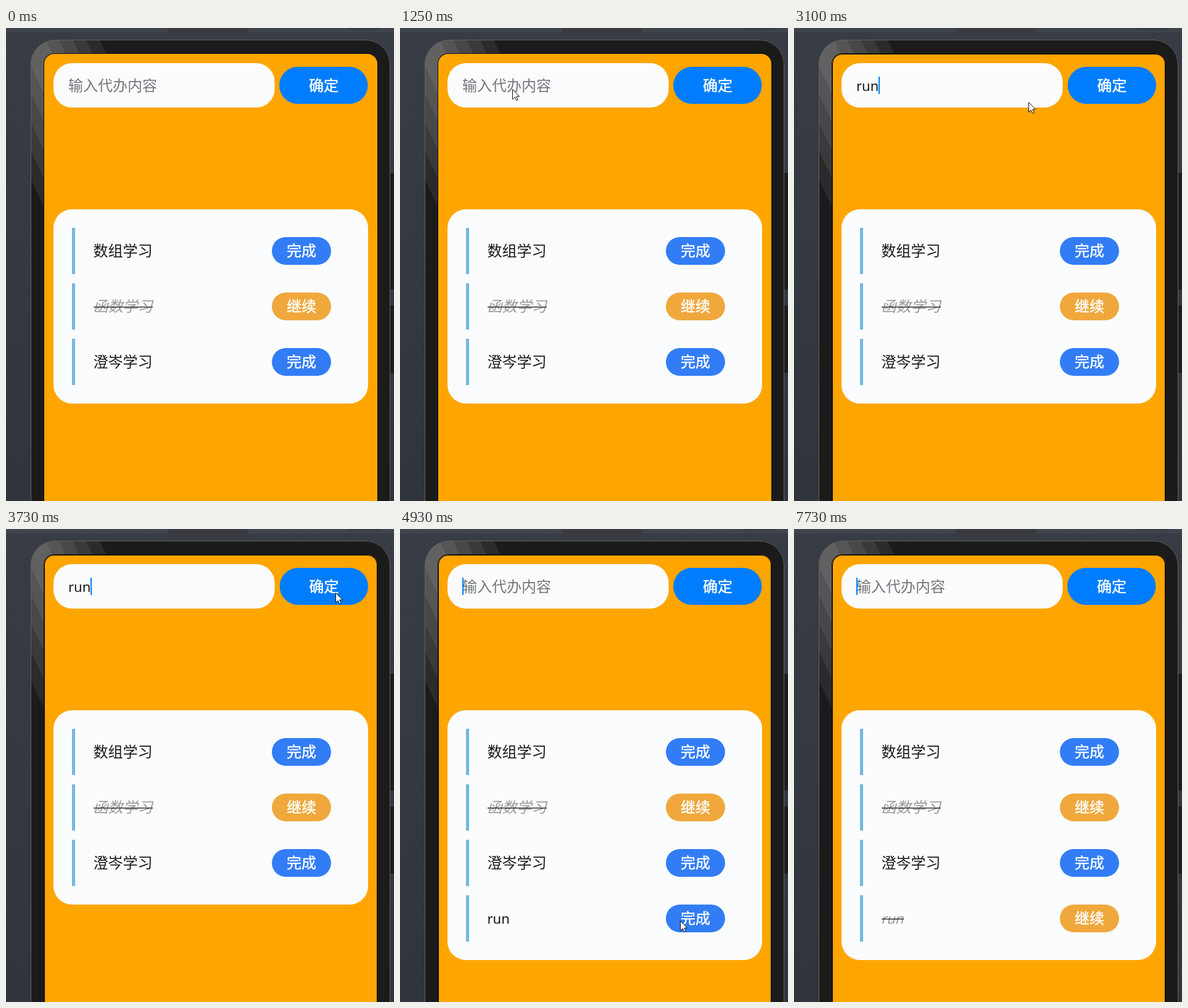
An HTML page for the animation above (8000 ms loop, 629x767 px).

```html
<!DOCTYPE html>
<html lang="zh-CN">
<head>
<meta charset="utf-8">
<title>待办列表</title>
<style>
  html, body { margin: 0; width: 100%; height: 100%; overflow: hidden; background: #343841; }
  svg { display: block; width: 629px; height: 767px; }
  text { font: 24px "Noto Sans CJK SC", "Noto Sans CJK", sans-serif; fill: #17181a; }
  .latin { font: 22px "Noto Sans", sans-serif; }
  .label { fill: #fff; stroke: #fff; stroke-width: .5px; text-anchor: middle; }
  .hint { fill: #74777b; }
  .faded { fill: #96999b; }
  .strike { stroke: #2c3032; stroke-width: 1.3; }
  .card, .field { fill: #fafcfe; }
  .blue { fill: #327df6; }
  .amber { fill: #f0a83c; }

  /* one loop is 8 s, so 1% is 80 ms */
  .step { animation: 8s step-end infinite; }
  .focus { animation-name: focus; }
  .hint { animation-name: hint; }
  .r { animation-name: r; }
  .u { animation-name: u; }
  .n { animation-name: n; }
  .caret { animation-name: blink, caretMove; animation-duration: 8s, 8s; }
  .nudge { animation-name: nudge; }
  .added { animation-name: added; }
  .todo { animation-name: todo; }
  .done { animation-name: done; }
  .pillPress { animation-name: pillPress; }
  .press { fill: #007dff; animation: press 8s linear infinite; }
  .pointer { animation: travel 8s linear infinite, pointerShow 8s step-end infinite; }

  @keyframes focus { 0% { visibility: hidden } 18.75%, 100% { visibility: visible } }
  @keyframes hint {
    0%, 50.875%, 100% { visibility: visible }
    28.625% { visibility: hidden }
  }
  @keyframes r { 0%, 50.875%, 100% { visibility: hidden } 28.625% { visibility: visible } }
  @keyframes u { 0%, 50.875%, 100% { visibility: hidden } 30.875% { visibility: visible } }
  @keyframes n { 0%, 50.875%, 100% { visibility: hidden } 32.125% { visibility: visible } }
  @keyframes blink {
    0%, 27.375%, 39.75%, 52.125%, 64.375%, 77.375%, 90%, 100% { visibility: hidden }
    21.125%, 28.625%, 45%, 57.875%, 71.25%, 83.75%, 96.625% { visibility: visible }
  }
  @keyframes caretMove {
    0%, 50.875%, 100% { transform: none }
    28.625% { transform: translateX(9px) }
    30.875% { transform: translateX(22.5px) }
    32.125% { transform: translateX(36px) }
  }
  @keyframes nudge {
    0%, 50.875%, 100% { transform: none }
    28.625% { transform: translateX(.6px) }
  }
  @keyframes press {
    0%, 50.24%, 54%, 100% { fill: #007dff }
    50.25%, 52.125% { fill: #0074ee }
  }
  @keyframes added { 0% { visibility: hidden } 50.875%, 100% { visibility: visible } }
  @keyframes todo {
    0%, 68.75%, 100% { visibility: hidden }
    50.875% { visibility: visible }
  }
  @keyframes pillPress { 0%, 68.75%, 100% { fill: #327df6 } 67.875% { fill: #2d70dd } }
  @keyframes done { 0% { visibility: hidden } 68.75%, 100% { visibility: visible } }
  @keyframes pointerShow {
    0%, 27.375%, 85.625%, 100% { visibility: hidden }
    1.25%, 38.75% { visibility: visible }
  }
  @keyframes travel {
    0%, 1.25% { transform: translate(205px, 760px) }
    3.75% { transform: translate(222px, 558px) }
    6.25% { transform: translate(237px, 315px) }
    8.75% { transform: translate(190px, 116px) }
    10.5%, 38.74% { transform: translate(182px, 99px) }
    38.75%, 39.74% { transform: translate(380px, 120px) }
    39.75%, 41.5% { transform: translate(428px, 143px) }
    44% { transform: translate(550px, 130px) }
    46.625%, 52.125% { transform: translate(534px, 103px) }
    54.375% { transform: translate(500px, 200px) }
    56.25% { transform: translate(454px, 311px) }
    57.5% { transform: translate(437px, 405px) }
    58.75% { transform: translate(440px, 490px) }
    60.375% { transform: translate(441px, 582px) }
    61.625%, 62.49% { transform: translate(454px, 635px) }
    62.5%, 75.99% { transform: translate(457px, 640px) }
    76%, 76.625% { transform: translate(458px, 644px) }
    78.75% { transform: translate(467px, 668px) }
    81.875% { transform: translate(480px, 715px) }
    85.625%, 100% { transform: translate(492px, 775px) }
  }
</style>
</head>
<body>
<svg viewBox="0 0 629 767">
  <defs>
    <linearGradient id="wall" x2="0" y2="1">
      <stop stop-color="#383c45"/>
      <stop offset="1" stop-color="#30343c"/>
    </linearGradient>
    <clipPath id="shell"><rect x="40" y="19" width="583" height="800" rx="40"/></clipPath>
    <path id="ray" d="M-15-101L245 445" stroke="#fff" stroke-opacity=".07"/>
    <rect id="bar" x="107" y="324" width="5" height="75" fill="#74b8de"/>
    <rect id="pill" x="431" y="339" width="96" height="45" rx="22.5"/>
    <g id="finish">
      <use href="#pill"/>
      <text class="label" x="479" y="370">完成</text>
    </g>
    <g id="resume">
      <use href="#pill"/>
      <text class="label" x="479" y="370">继续</text>
    </g>
  </defs>

  <!-- desktop -->
  <rect width="629" height="767" fill="url(#wall)"/>
  <rect width="629" height="7" fill="#40444c"/>
  <rect x="263" y="-10" width="130" height="24" rx="9" fill="#393b40"/>
  <rect x="557.5" y="-8.5" width="49" height="10" fill="none" stroke="#2b2e34"/>
  <rect x="616" y="235" width="30" height="189" rx="4" fill="#1d1d1e"/>
  <rect x="616" y="450" width="30" height="109" rx="4" fill="#1d1d1e"/>

  <!-- phone -->
  <g clip-path="url(#shell)">
    <rect width="629" height="767" fill="#1b1b1b"/>
    <use href="#ray" stroke-width="198"/>
    <use href="#ray" stroke-width="158"/>
    <use href="#ray" stroke-width="119"/>
    <use href="#ray" stroke-width="79"/>
    <use href="#ray" stroke-width="40"/>
  </g>
  <rect x="40.5" y="19.5" width="582" height="800" rx="39.5" fill="none" stroke="#626262"/>
  <rect x="61" y="41" width="542" height="780" rx="17" fill="#111"/>
  <rect x="62" y="42" width="540" height="780" rx="16" fill="#ffa500"/>
  <rect class="step focus" x="62.5" y="42.5" width="539" height="780" rx="15.5" fill="none" stroke="#15130f"/>

  <!-- input line -->
  <rect class="field" x="77" y="57" width="358.5" height="72" rx="30"/>
  <text class="step hint" x="101" y="102">输入代办内容</text>
  <text class="latin" x="101" y="102"><tspan class="step r">r</tspan><tspan class="step u">u</tspan><tspan class="step n">n</tspan></text>
  <rect class="step caret" x="101" y="79" width="2" height="28" fill="#007dff"/>
  <g class="step nudge">
    <rect class="press" x="443" y="63" width="143.5" height="60" rx="30"/>
    <text class="label" x="515" y="102">确定</text>
  </g>

  <!-- list -->
  <rect class="card" x="77" y="294" width="510" height="315" rx="30"/>
  <g class="step added">
    <rect class="card" x="77" y="294" width="510" height="405" rx="30"/>
    <use href="#bar" y="270"/>
  </g>
  <use href="#bar"/>
  <use href="#bar" y="90"/>
  <use href="#bar" y="180"/>

  <text x="141.5" y="370">数组学习</text>
  <use href="#finish" class="blue"/>

  <text class="faded" transform="translate(141.5 460) skewX(-14)">函数学习</text>
  <path class="strike" d="M142 452.5H238"/>
  <use href="#resume" class="amber" y="90"/>

  <text x="141.5" y="550">澄岑学习</text>
  <use href="#finish" class="blue" y="180"/>

  <g class="step todo">
    <text class="latin" x="141.5" y="640">run</text>
    <use href="#finish" class="step pillPress" y="270"/>
  </g>
  <g class="step done">
    <text class="latin faded" transform="translate(141 640) skewX(-14)">run</text>
    <path class="strike" d="M142 632.5H178"/>
    <use href="#resume" class="amber" y="270"/>
  </g>

  <path class="pointer" d="M.5.5V16.5L4.2 13L6.8 18.6L9.2 17.5L6.7 12H11.6Z" fill="#fff" stroke="#111"/>
</svg>
</body>
</html>
```
